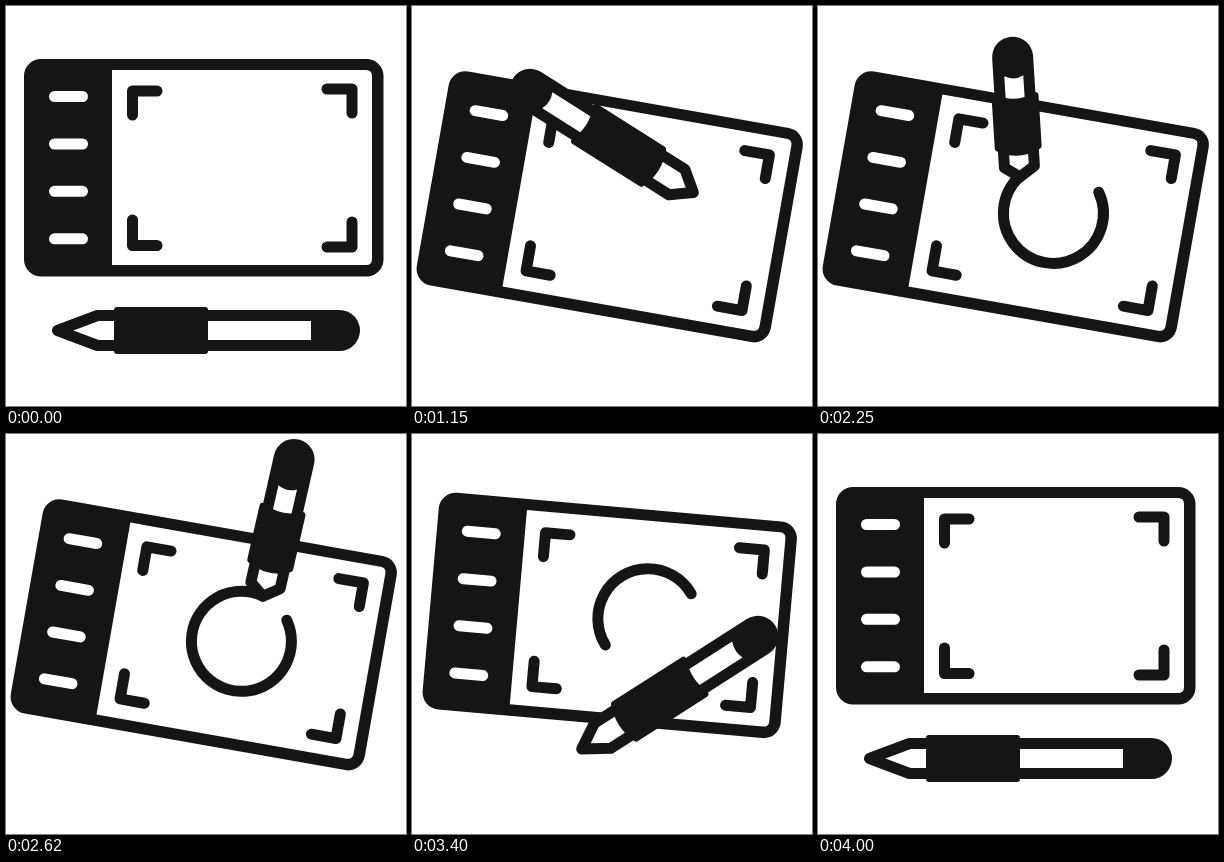
These frames come from a looping animation (400x400 px, 4.02 s). An HTML page:

```html
<!DOCTYPE html>
<html lang="en">
<head>
<meta charset="utf-8">
<title>Drawing tablet</title>
<style>
  html, body { margin: 0; width: 100%; height: 100%; overflow: hidden; background: #fff; }
  svg { display: block; width: 100%; height: 100%; }
  .ink { fill: #151515; }
  .paper { fill: #fff; }
  .line { fill: none; stroke: #151515; stroke-width: 11; stroke-linecap: round; stroke-linejoin: round; }
  #cone { fill: #fff; }
  #grip { stroke: #151515; stroke-width: 6; stroke-linejoin: round; }
</style>
</head>
<body>
<svg viewBox="0 0 400 400">
  <g id="tablet">
    <rect class="ink" x="18" y="53" width="359.5" height="217.5" rx="17"/>
    <path class="paper" d="M106 64H360Q366 64 366 70V253Q366 259 360 259H106Z"/>
    <path class="paper" id="keys"/>
    <path class="line" d="M126.5 109V85H151 M321 83H346V107 M126.5 214V239.5H151 M321 241H346V216"/>
    <path class="line" id="ring"/>
  </g>
  <g id="pen">
    <path class="line" id="cone"/>
    <path class="ink" id="body"/>
    <path class="paper" id="window"/>
    <path class="ink" id="grip"/>
  </g>
</svg>
<script>
const LOOP = 4020, RAD = Math.PI / 180;
const RING = { x: 236, y: 161.7, r: 50, from: -35 };
const TILT = 10, DROP = 39;
const DRAW_START = 1150, DRAW_END = 2900;
const $ = id => document.getElementById(id);
const setPath = (id, d) => $(id).setAttribute('d', d);

// Monotone cubic through rows of [input, value, value, ...]
function curve(rows) {
  const n = rows.length;
  const slope = (i, k) => (rows[i + 1][k] - rows[i][k]) / (rows[i + 1][0] - rows[i][0]);
  const tangent = (i, k) => {
    if (i === 0 || i === n - 1) return 0;
    const a = slope(i - 1, k), b = slope(i, k);
    return a * b <= 0 ? 0 : 2 * a * b / (a + b);
  };
  return v => {
    if (v <= rows[0][0]) return rows[0].slice(1);
    if (v >= rows[n - 1][0]) return rows[n - 1].slice(1);
    let i = 0;
    while (v > rows[i + 1][0]) i++;
    const h = rows[i + 1][0] - rows[i][0], u = (v - rows[i][0]) / h;
    return rows[i].slice(1).map((p, j) => {
      const k = j + 1, q = rows[i + 1][k];
      return p + (q - p) * u * u * (3 - 2 * u)
        + h * u * (1 - u) * ((1 - u) * tangent(i, k) - u * tangent(i + 1, k));
    });
  };
}

const ease = (t, a, b) => {
  const u = Math.min(1, Math.max(0, (t - a) / (b - a)));
  return (1 - Math.cos(Math.PI * u)) / 2;
};

// time: tip x, tip y
const tipAt = curve([
  [520, 51.5, 324.5], [750, 191.5, 262.5], [1050, 271, 195], [1150, 281.3, 186.5],
  [2900, 281.3, 186.5], [3070, 287, 214], [3400, 170, 315], [3900, 51.5, 324.5]
]);
// time: pen direction in degrees
const angleAt = curve([
  [520, 360], [750, 315.4], [1050, 231], [1150, 212.3], [1600, 220], [1900, 240],
  [2250, 266.4], [2500, 277], [2670, 284], [3070, 286], [3400, 327.3], [3900, 360]
]);
// time: distance from tip to cap centre
const reachAt = curve([
  [520, 282], [750, 210], [1150, 193], [1600, 176], [1900, 135], [2250, 120],
  [2500, 135], [2670, 143], [2900, 167], [3070, 190], [3400, 209], [3900, 282]
]);
// reach: shoulder, grip start, grip end, window end
const partsAt = curve([
  [120, 10, 24, 81, 100], [191, 19, 43, 128, 170],
  [210, 25, 46.5, 135, 184.5], [282, 40, 56.5, 150.5, 253.5]
]);
// time: share of the ring drawn
const drawnAt = curve([
  [DRAW_START, 0], [1600, .08], [2150, .61], [2250, .70], [2670, .91], [DRAW_END, 1]
]);

function ringPoint(deg) {
  return [RING.x + RING.r * Math.cos(deg * RAD), RING.y + RING.r * Math.sin(deg * RAD)];
}

function ringPath(a, b) {
  if (b - a < .002) return '';
  const at = s => ringPoint(RING.from + 360 * s).join(' ');
  const arc = s => `A${RING.r} ${RING.r} 0 0 1 ${at(s)}`;
  const step = (b - a) / 3;
  return `M${at(a)}${arc(a + step)}${arc(a + 2 * step)}${arc(b)}`;
}

function tipOnRing(share) {
  const a = (RING.from + TILT + 360 * share) * RAD;
  return [236 + RING.r * Math.cos(a), 207.6 + RING.r * Math.sin(a)];
}

function drawPen(t) {
  const drawing = t >= DRAW_START && t <= DRAW_END;
  const [x, y] = drawing ? tipOnRing(drawnAt(t)[0]) : tipAt(t);
  const reach = reachAt(t)[0];
  const [shoulder, gripStart, gripEnd, windowEnd] = partsAt(reach);
  const sag = 6 * Math.sqrt(Math.max(0, 1 - (reach / 282) ** 2));
  const g0 = gripStart + 3 + sag / 2, g1 = gripEnd - 3 + sag / 2, w = windowEnd + sag / 4;

  $('pen').setAttribute('transform', `translate(${x} ${y}) rotate(${angleAt(t)[0]})`);
  setPath('cone', `M0 0L${shoulder} -15H${gripStart + 8}V15H${shoulder}Z`);
  setPath('body', `M${gripStart + 8} -20.5H${reach}A20.5 20.5 0 0 1 ${reach} 20.5H${gripStart + 8}Z`);
  setPath('window', `M${g1 - 12} -9.5H${w}Q${w - sag} 0 ${w} 9.5H${g1 - 12}Z`);
  setPath('grip', `M${g0} -20.5H${g1}Q${g1 - 2 * sag} 0 ${g1} 20.5H${g0}Q${g0 - 2 * sag} 0 ${g0} -20.5Z`);
}

function render(t) {
  const lift = ease(t, 500, 1000) - ease(t, 3150, 3655);
  $('tablet').setAttribute('transform',
    t < 520 ? '' : `translate(0 ${DROP * lift}) rotate(${TILT * lift} 197.7 161.7)`);
  setPath('ring', ringPath(ease(t, 3150, 3655), drawnAt(t)[0]));
  drawPen(t);
}

setPath('keys', [90.5, 138, 185.3, 232.8].map(y =>
  `M48.5 ${y - 5.5}H76.5a5.5 5.5 0 0 1 0 11H48.5a5.5 5.5 0 0 1 0 -11Z`).join(''));

const begin = performance.now();
function tick() {
  render((performance.now() - begin) % LOOP);
  requestAnimationFrame(tick);
}
tick();
</script>
</body>
</html>
```
